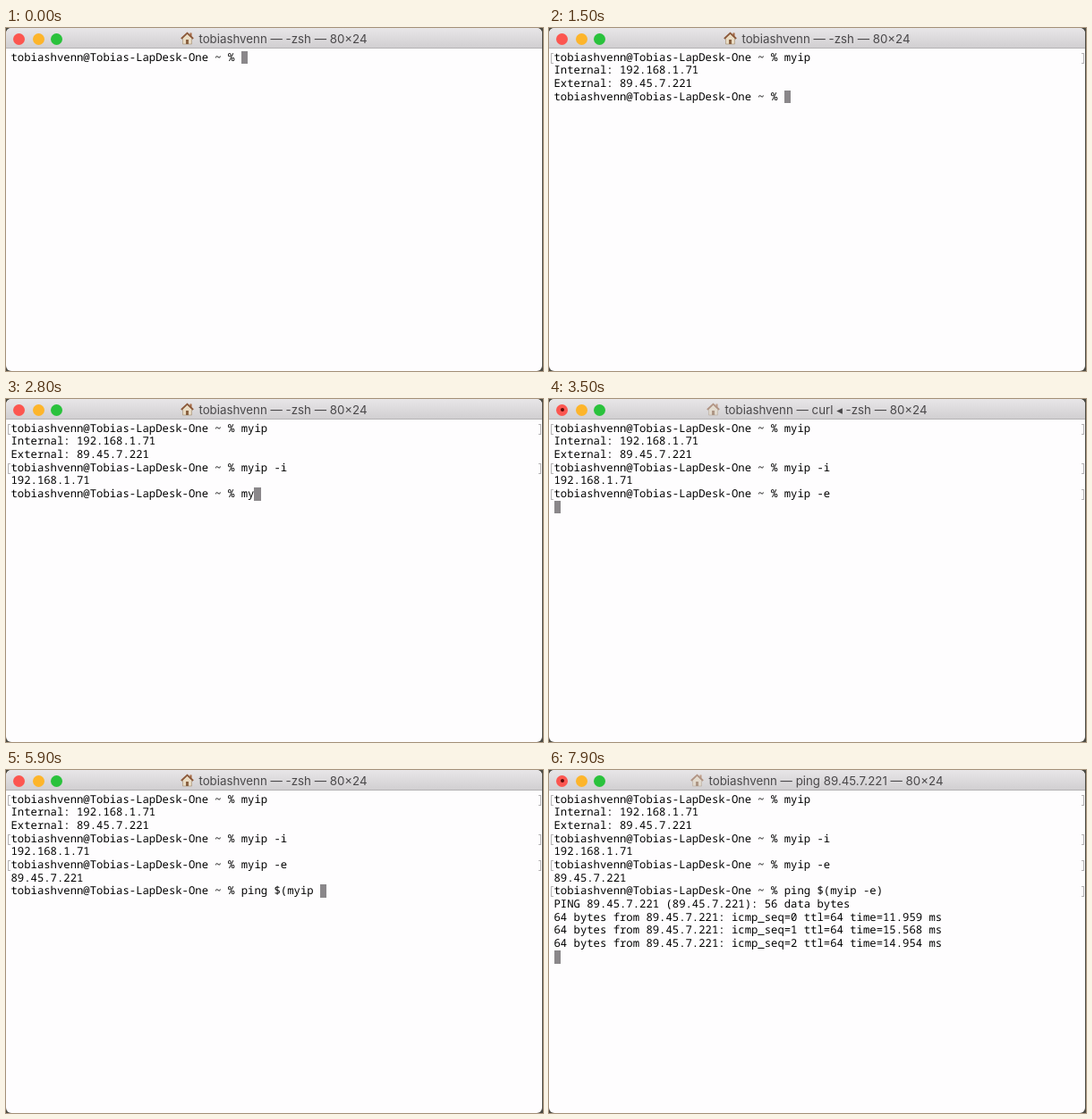
Recreate the animation shown at these times as an HTML page. Size 600 px wide and 384 px high, loop 8 s.

```html
<!DOCTYPE html>
<html lang="en">
<head>
<meta charset="utf-8">
<title>Terminal</title>
<style>
html, body { margin: 0; width: 100%; height: 100%; overflow: hidden; background: #4b4a42; }
#win { position: absolute; width: 599px; height: 384px; overflow: hidden; border-radius: 6px; background: #fefdfe; }
#bar { position: absolute; inset: 0 0 auto; height: 22px; border-bottom: 1px solid #b4b2b4;
  background: linear-gradient(#e8e6e8, #d1cfd1); }
.light { position: absolute; top: 5.5px; width: 13px; height: 13px; border-radius: 50%; }
#dot { position: absolute; left: 4.5px; top: 4.5px; width: 4px; height: 4px; border-radius: 50%; background: #5c0a08; }
#title { position: absolute; inset: 1px 0 0; display: flex; justify-content: center; align-items: center; gap: 5px;
  font: 13.3px Inter, Roboto, sans-serif; color: #4a484a; white-space: pre; }
#screen { position: absolute; left: 5.5px; top: 25.5px; color: #000; white-space: pre;
  font: 500 12.25px/14.7px "Noto Sans Mono", "DejaVu Sans Mono", monospace; text-rendering: geometricPrecision; }
.row { position: relative; height: 14.7px; }
.cmd::before, .cmd::after { content: ""; position: absolute; top: 2px; width: 2px; height: 10px; border: 1px solid #b5b3b5; }
.cmd::before { left: -4px; border-right: 0; }
.cmd::after { left: 589.5px; border-left: 0; }
#cursor { position: absolute; width: 1ch; height: 14.7px; background: #8a878a; }
</style>
</head>
<body>
<div id="win">
  <div id="bar">
    <div class="light" style="left:8px;background:#fc5650"><div id="dot"></div></div>
    <div class="light" style="left:29.5px;background:#fdb52b"></div>
    <div class="light" style="left:50px;background:#2ac23c"></div>
    <div id="title">
      <svg id="house" width="15" height="15" viewBox="0 0 15 15">
        <path d="M2.5 7 7.5 2.5 12.5 7V14H2.5Z" fill="#e9dcc4" stroke="#a08a70" stroke-width=".6"/>
        <path d="M10.5 1.5h2V6h-2Z" fill="#a5673f"/>
        <path d="M.8 8 7.5 1.7 14.2 8" fill="none" stroke="#8d5a3b" stroke-width="1.8"/>
        <path d="M6 9h3v5H6Z" fill="#8a6242"/>
      </svg>
      <span id="name"></span>
    </div>
  </div>
  <div id="screen"><div id="cursor"></div><div id="rows"></div></div>
</div>
<script>
const LOOP = 8000, USER = "tobiashvenn", IP = "89.45.7.221", LOCAL = "192.168.1.71";
const PROMPT = USER + "@Tobias-LapDesk-One ~ % ";
const reply = (seq, ms) => `64 bytes from ${IP}: icmp_seq=${seq} ttl=64 time=${ms} ms\n`;
// One key per 100 ms
const type = (start, text) => [...text].map((c, i) => [start + i * 100, c]);

const output = [
  [0, PROMPT], ...type(200, "myip"),
  [700, `\nInternal: ${LOCAL}\n`], [1000, `External: ${IP}\n${PROMPT}`],
  ...type(1600, "myip -i"),
  [2400, "\n"], [2500, `${LOCAL}\n${PROMPT}`],
  [2700, "m"], [2800, "y"], [2900, "ip"], ...type(3100, " -e"),
  [3500, "\n"], [3700, `${IP}\n${PROMPT}`],
  [4200, "p"], [4400, "i"], [4500, "n"], [4600, "g "], [4800, "$"], [5000, "("],
  [5400, "my"], [5600, "ip"], [5800, " "], [6000, "-"], [6100, "e"], [6400, ")"],
  [6800, "\n"], [6900, `PING ${IP} (${IP}): 56 data bytes\n` + reply(0, "11.959")],
  [7400, reply(1, "15.568")], [7900, reply(2, "14.954")]
];
const jobs = [
  [0, "-zsh"], [700, "curl ◂ -zsh"], [1100, "-zsh"], [3500, "curl ◂ -zsh"],
  [3800, "-zsh"], [6800, "curl ◂ -zsh"], [7000, "ping " + IP]
];

const $ = id => document.getElementById(id);
const until = (list, t) => list.filter(([at]) => at <= t).map(([, text]) => text);
let shown;

function draw(now) {
  const t = now % LOOP;
  const text = until(output, t).join(""), job = until(jobs, t).pop();
  if (shown !== text + job) {
    shown = text + job;
    const lines = text.split("\n"), last = lines.length - 1;
    $("rows").replaceChildren(...lines.map((line, i) => {
      const row = document.createElement("div");
      row.className = i < last && line.startsWith(PROMPT) ? "row cmd" : "row";
      row.textContent = line;
      return row;
    }));
    $("cursor").style.left = lines[last].length + "ch";
    $("cursor").style.top = last * 14.7 + "px";
    const busy = job !== "-zsh";
    $("name").textContent = `${USER} — ${job} — 80×24`;
    $("dot").hidden = !busy;
    $("house").style.opacity = busy ? .55 : 1;
  }
  requestAnimationFrame(draw);
}
requestAnimationFrame(draw);
</script>
</body>
</html>
```
